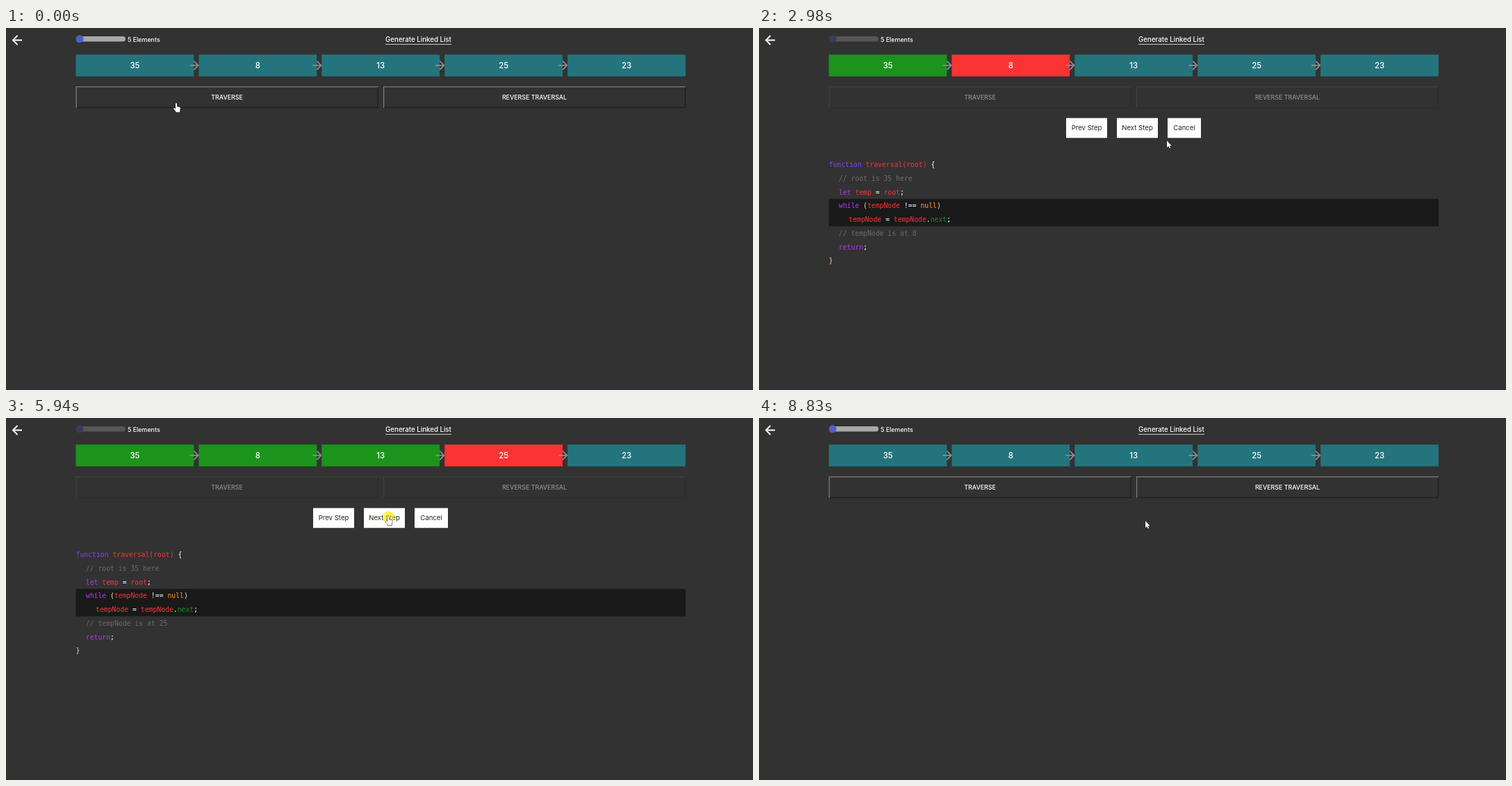
An HTML page with a canvas for the animation above (8900 ms loop, 1075x521 px).

```html
<!DOCTYPE html>
<html lang="en">
<head>
<meta charset="utf-8">
<title>Linked list traversal</title>
<style>
html, body { margin: 0; width: 100%; height: 100%; overflow: hidden; background: #323232; }
canvas { display: block; }
</style>
</head>
<body>
<canvas id="stage" width="1075" height="521"></canvas>
<script>
const g = document.getElementById('stage').getContext('2d');
const LOOP = 8900, REACT = 60;
const SANS = 'Inter, "Open Sans", sans-serif';
const MONO = '"DejaVu Sans Mono", "Liberation Mono", monospace';
const TEAL = [36, 116, 125], RED = [251, 51, 51], GREEN = [28, 148, 28];
const values = [35, 8, 13, 25, 23];
const clicks = [40, 2100, 3590, 4800, 5940, 7130, 8530];

// Cursor path: time, x, y
const path = [
  [0, 245, 108], [650, 245, 108], [740, 222, 140], [850, 175, 188], [990, 245.5, 211],
  [1070, 290, 216], [1250, 420, 190], [1400, 495, 160], [1540, 523, 150],
  [1570, 525, 150], [1740, 536, 155], [2400, 536, 155], [2700, 560, 161], [2980, 587, 162],
  [3030, 586, 161], [3220, 566, 126], [3430, 550, 141], [8040, 550, 141],
  [8330, 612, 141.5], [8620, 612, 141.5], [8830, 556, 148], [LOOP, 556, 148]
];

const V = '#8a3ff5', P = '#b03af0', R = '#f93434', W = '#fff', O = '#ff9a2e',
      B = '#ffe0b5', C = '#6c6c6c', N = '#228b22';
const code = at => [
  [0, ['function ', V], ['traversal(root) ', R], ['{', W]],
  [1, ['// root is 35 here', C]],
  [1, ['let ', P], ['temp ', R], ['= ', W], ['root', R], [';', W]],
  [1, ['while ', P], ['(', B], ['tempNode ', R], ['!== ', W], ['null', O], [')', B]],
  [2, ['tempNode ', R], ['= ', W], ['tempNode', R], ['.', W], ['next', N], [';', W]],
  [1, ['// tempNode is at ' + at, C]],
  [1, ['return', P], [';', W]],
  [0, ['}', '#ffcf8f']]
];

const clamp = v => Math.max(0, Math.min(1, v));
const mix = (a, b, p) => a + (b - a) * p;

function rect(x, y, w, h, color) {
  g.fillStyle = color;
  g.fillRect(x, y, w, h);
}

function text(s, x, y, size, color, align = 'center', weight = 500, family = SANS) {
  g.font = `${weight} ${size}px ${family}`;
  g.textAlign = align;
  g.fillStyle = color;
  g.fillText(s, x, y);
}

function line(points, color, width) {
  g.beginPath();
  points.forEach(([x, y]) => g.lineTo(x, y));
  g.strokeStyle = color;
  g.lineWidth = width;
  g.stroke();
}

function disc(x, y, r, color) {
  g.beginPath();
  g.arc(x, y, r, 0, 7);
  g.fillStyle = color;
  g.fill();
}

// -1 and 6: idle, 0 to 4: current node, 5: finished
const running = s => s >= 0 && s < 6;
const nodeColor = (i, s) => !running(s) || i > s ? TEAL : i === s ? RED : GREEN;

function header(dim) {
  line([[23, 17.5], [10.5, 17.5]], W, 2);
  line([[16.5, 11], [10, 17.5], [16.5, 24]], W, 2);
  g.globalAlpha = mix(1, 0.3, dim);
  g.beginPath();
  g.roundRect(101, 12, 71, 7.5, 3.75);
  g.fillStyle = '#a8a8a8';
  g.fill();
  g.globalAlpha = 1;
  disc(106, 15.8, 5.5, `rgb(${mix(74, 55, dim)},${mix(98, 62, dim)},${mix(192, 92, dim)})`);
  text('5 Elements', 175, 19.8, 8.9, W, 'left');
  text('Generate Linked List', 593.5, 19.8, 9.7, W);
  rect(546, 23, 95, 1, '#c8c8c8');
}

function nodes(s, p) {
  values.forEach((v, i) => {
    const from = nodeColor(i, s - 1), to = nodeColor(i, s), x = 100.5 + 176.9 * i;
    rect(x, 38.3, 169.8, 31.3, `rgb(${from.map((c, k) => mix(c, to[k], p))})`);
    text(v, x + 84.9, 58, 11.4, W);
  });
  for (let i = 0; i < 4; i++) {
    const x = 277 + 176.9 * i;
    line([[x - 12.5, 53.8], [x - 1, 53.8]], '#8e8e8e', 1.8);
    line([[x - 6.5, 47.5], [x - 0.5, 53.8], [x - 6.5, 60.1]], '#8e8e8e', 1.8);
  }
}

function modeButton(label, x, dim) {
  const r = x + 435, light = mix(122, 64, dim), dark = mix(30, 45, dim);
  line([[r, 114.5], [x, 114.5]], `rgb(${dark},${dark},${dark})`, 1.3);
  line([[r - 0.5, 84], [r - 0.5, 115]], `rgb(${dark},${dark},${dark})`, 1.3);
  line([[x + 0.6, 115], [x + 0.6, 84.6], [r, 84.6]], `rgb(${light},${light},${light})`, 1.3);
  text(label, x + 217.5, 102.8, 8.85, `rgba(255,255,255,${mix(1, 0.45, dim)})`);
}

// Label, left, width, enabled
const stepButtons = s => s === 5
  ? [['Prev Step', 446.5, 59, true], ['Next Step', 519.5, 59, false], ['Done', 592, 40, true]]
  : [['Prev Step', 442, 59, s > 0], ['Next Step', 515, 59, true], ['Cancel', 588, 48, true]];

function steps(s) {
  for (const [label, x, w, on] of stepButtons(s)) {
    rect(x, 129.6, w, 28.6, on ? W : '#5a5a5a');
    text(label, x + w / 2, 147, 9.6, on ? '#222' : '#353535', 'center', 400);
  }
}

function listing(s, age) {
  const row = 19.75, top = 186.7;
  const mark = (first, count) => rect(100.5, top + row * first, 877.5, row * count, '#191919');
  if (s === 0) mark(2, 3);
  else if (s < 5) mark(3, 2);
  else if (age >= 220) mark(6, 1);
  code(values[s] ?? 'null').forEach(([indent, ...tokens], i) => {
    let x = 100.5 + 14.3 * indent;
    for (const [str, color] of tokens) {
      text(str, x, 200.2 + row * i, 9.77, color, 'left', 400, MONO);
      x += g.measureText(str).width;
    }
  });
}

function cursorAt(t) {
  const i = path.findIndex(k => k[0] > t), a = path[i - 1], b = path[i];
  const p = (t - a[0]) / (b[0] - a[0]);
  return [mix(a[1], b[1], p), mix(a[2], b[2], p)];
}

function overButton(x, y, s) {
  if (!running(s)) return y > 84 && y < 115 && x > 100 && x < 978;
  return y > 130 && y < 158 && stepButtons(s).some(([, l, w, on]) => on && x > l && x < l + w);
}

const arrow = new Path2D('M0 0V10L2.3 8L3.8 11.2L5.3 10.5L3.9 7.4H6.8Z');
const hand = new Path2D('M-1 .8Q0 -.6 1 .8V5L5 6Q6 6.3 6 7.5L5.2 11V13.3H-.8V11.8L-3.8 8.3Q-3.8 6.8 -2.4 7.2L-1 8.6Z');

function cursor(x, y, shape) {
  g.save();
  g.translate(x, y);
  g.lineWidth = 1;
  g.lineJoin = 'round';
  g.strokeStyle = '#111';
  g.stroke(shape);
  g.fillStyle = W;
  g.fill(shape);
  g.restore();
}

function draw(t) {
  const s = clicks.filter(c => t >= c + REACT).length - 1;
  const age = s < 0 ? LOOP : t - clicks[s];
  const fade = clamp((age - REACT) / 240);
  const dim = s < 0 ? 0 : s === 0 ? fade : s === 6 ? 1 - fade : 1;

  rect(0, 0, 1075, 521, '#323232');
  header(dim);
  nodes(s, clamp((age - REACT) / 100));
  modeButton('TRAVERSE', 100.5, dim);
  modeButton('REVERSE TRAVERSAL', 543, dim);
  if (running(s)) {
    steps(s);
    listing(s, age);
  }
  const [x, y] = cursorAt(t);
  if (clicks.some(c => t >= c && t < c + 160)) disc(x + 0.5, y + 1.7, 8.7, 'rgba(255,235,0,.65)');
  cursor(x, y, overButton(x, y, s) ? hand : arrow);
}

const start = performance.now();
function tick() {
  draw((performance.now() - start) % LOOP);
  requestAnimationFrame(tick);
}
tick();
</script>
</body>
</html>
```
